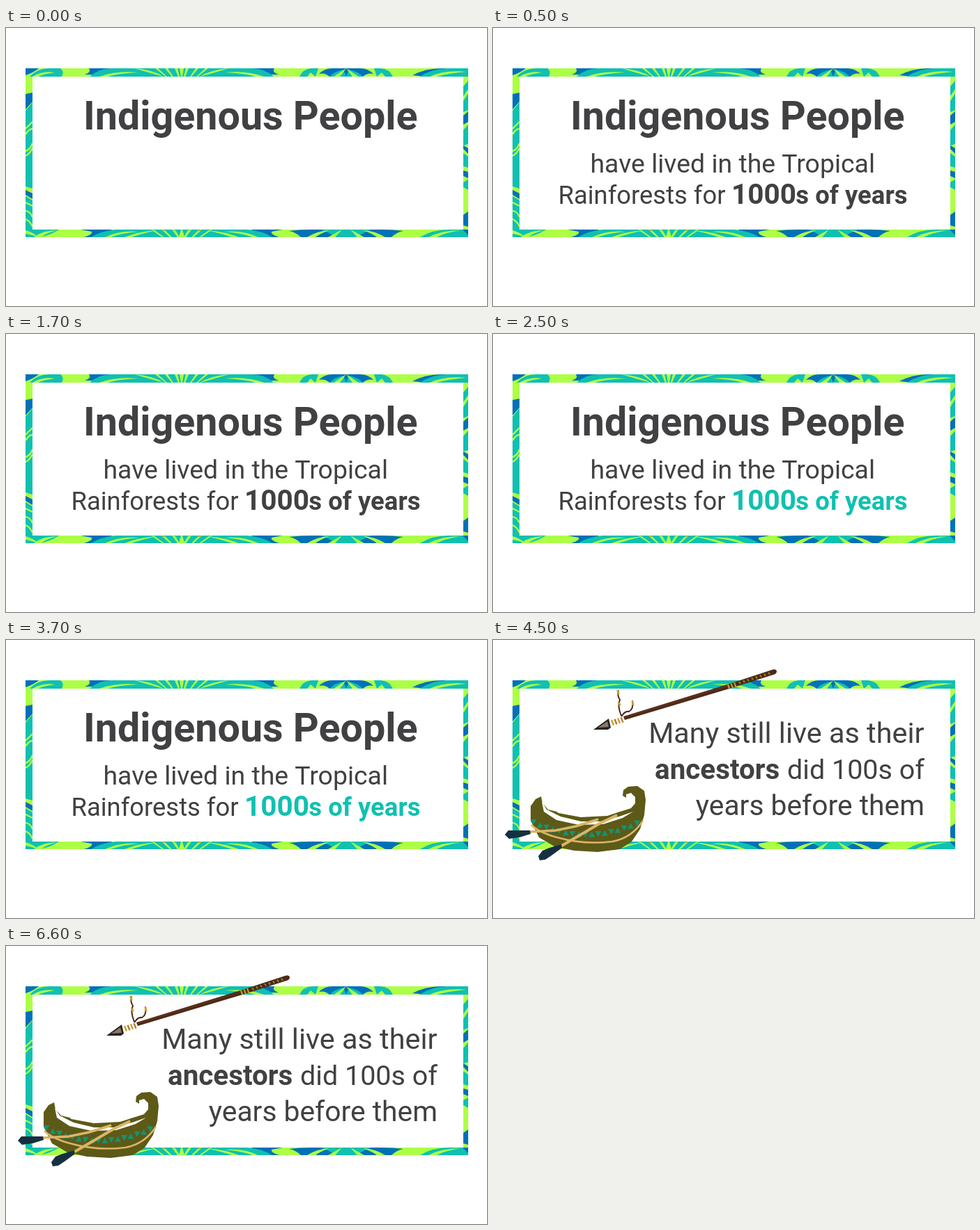
An HTML page with a canvas that plays this animation: 690x400 px, repeating every 8000 ms.

```html
<!DOCTYPE html>
<html lang="en">
<head>
<meta charset="utf-8">
<title>Indigenous People</title>
<style>
  html, body { margin: 0; width: 100%; height: 100%; overflow: hidden; background: #fff; }
  canvas { display: block; }
</style>
</head>
<body>
<canvas id="stage" width="690" height="400"></canvas>
<script>
const ctx = document.getElementById('stage').getContext('2d');
const LOOP = 8000;
const INK = '#414042', TEAL = '#10c0b1', LIME = '#adff46', BLUE = '#0071b8';
const OLIVE = '#5d5a18', TAN = '#dbb466', NAVY = '#17303f', BROWN = '#4c2a17', GOLD = '#c9a12c';

function fill(color, path) {
  ctx.fillStyle = color;
  ctx.fill(new Path2D(path));
}

function stroke(color, width, path) {
  ctx.strokeStyle = color;
  ctx.lineWidth = width;
  ctx.stroke(new Path2D(path));
}

function text(str, x, y, size, weight = 400, color = INK, align = 'left') {
  ctx.font = `${weight} ${size}px Roboto, sans-serif`;
  ctx.textAlign = align;
  ctx.fillStyle = color;
  ctx.fillText(str, x, y);
}

// Draws once as given and once reflected about the vertical line x = axis.
function mirrored(axis, draw) {
  draw();
  ctx.save();
  ctx.translate(2 * axis, 0);
  ctx.scale(-1, 1);
  draw();
  ctx.restore();
}

function topEdge() {
  fill(BLUE, 'M28 58H47Q38 65 28 68Z');
  fill(TEAL, 'M34 70Q45 58 62 58H78Q84 62 80 70Z');
  fill(LIME, 'M38 70Q52 61 70 64Q54 66 46 70Z');
  mirrored(252, () => {
    fill(BLUE, 'M119 58H150L132 67L113 67Q123 64 119 58Z');
    fill(TEAL, 'M120 70Q133 58 152 58H252V70Z');
    fill(LIME, 'M134 70Q157 61 190 64Q162 65 146 70ZM184 58Q210 60 226 70Q204 64 184 58Z');
    for (let i = 0; i < 3; i++) {
      const x = 247 - i * 9;
      fill(LIME, `M${x} 70L${x - 5 - i * 5} 58h4L${x + 2} 70Z`);
    }
  });
  fill(LIME, 'M249 58h6l-2 12h-2Z');
  mirrored(488, () => {
    fill(TEAL, 'M421 70Q426 59 438 58H448L444 70L437 64L432 70Z');
    fill(BLUE, 'M449 66Q457 58 468 58H488V70H464Q458 64 449 66Z');
    fill(TEAL, 'M464 70Q472 62 484 60L488 70Z');
    fill(LIME, 'M470 70L488 58L479 70Z');
  });
  fill(BLUE, 'M583 68Q602 58 624 58H632L605 70Z');
  fill(TEAL, 'M593 70Q612 58 635 58H663V70Z');
  fill(LIME, 'M608 70Q629 60 660 63Q634 65 618 70Z');
}

function bottomEdge() {
  fill(TEAL, 'M28 290H76Q64 298 48 301H28Z');
  fill(LIME, 'M28 291Q39 294 46 301Q36 297 28 296ZM40 301Q53 291 73 291Q58 295 50 301Z');
  mirrored(252, () => {
    fill(BLUE, 'M107 290H152L139 301H112Q125 297 123 293Z');
    fill(TEAL, 'M122 301Q136 292 158 290H252V301Z');
    fill(LIME, 'M142 301Q162 291 190 293Q166 295 150 301ZM170 301Q190 293 216 291Q194 296 180 301Z');
    for (let i = 0; i < 3; i++) {
      const x = 246 - i * 11;
      fill(LIME, `M${x} 301L${x - 8 - i * 4} 290l5 1L${x + 3} 301Z`);
    }
    fill('#d99a2b', 'M222 290h4l3 3Z');
  });
  fill(LIME, 'M251 290h2l3 11h-8Z');
  mirrored(488, () => {
    fill(BLUE, 'M406 292Q421 290 437 290H488V301H423Q416 294 406 292Z');
    fill(TEAL, 'M452 290H488V301H472Q464 294 452 290Z');
    fill(LIME, 'M432 301Q446 292 464 291Q450 296 444 301ZM462 301L482 290L472 301Z');
  });
  fill(TEAL, 'M594 301Q611 290 636 290H663V301Z');
  fill(LIME, 'M606 301Q625 291 652 291Q628 295 618 301Z');
  fill(BLUE, 'M655 290H663V298Z');
}

function sideEdges() {
  fill(BLUE, 'M28 95L38 93V106L28 117Z');
  fill(TEAL, 'M28 119L38 107V231L28 228Z');
  stroke(LIME, 2.4, 'M28 145L38 135M28 153Q33 145 38 145M28 177Q35 175 38 166M28 184Q34 181 38 173');
  fill(BLUE, 'M28 233L38 238V246L28 240Z');
  fill(TEAL, 'M28 242L38 248V290H28Z');
  stroke(LIME, 2.2, 'M28 251L38 256M28 263Q35 264 38 272M28 275Q35 278 38 286');
  fill(TEAL, 'M656 84L663 76V88L656 98Z');
  fill(TEAL, 'M656 105L663 94V118L656 121Z');
  fill(BLUE, 'M656 126L663 120V135L656 139Z');
  fill(TEAL, 'M656 147L663 139V167L656 169Z');
  fill(BLUE, 'M656 169L663 173V181L656 174Z');
  fill(TEAL, 'M656 180L663 185V201L656 199Z');
  fill(BLUE, 'M656 205L663 207V216L656 213Z');
  fill(TEAL, 'M656 222L663 218V233L656 229Z');
  fill(BLUE, 'M656 269L663 264V286L656 284Z');
}

function border() {
  ctx.save();
  ctx.beginPath();
  ctx.rect(28, 58, 635, 243);
  ctx.rect(38, 70, 618, 220);
  ctx.clip('evenodd');
  ctx.fillStyle = LIME;
  ctx.fillRect(28, 58, 635, 243);
  topEdge();
  bottomEdge();
  sideEdges();
  ctx.restore();
}

function spear() {
  ctx.lineCap = 'round';
  stroke(BROWN, 2, 'M184 109Q178 94 182 86Q178 80 180 73M185 109Q189 102 195 103Q202 99 200 88');
  stroke(GOLD, 3, 'M179 73l1 4M181 91l1 2M200 89l1 4');
  ctx.lineCap = 'butt';
  fill(BROWN, 'M187 110L336 64L400 43Q406 41 407 45Q407 49 402 50L339 70L189 115Z');
  stroke('#713524', 1, 'M189 111L337 66');
  fill('#262424', 'M144 129L166 113L169 126L165 129Z');
  fill('#8d7865', 'M151 126L164 117L166 125Z');
  for (let i = 0; i < 4; i++) stroke(i % 2 ? '#b57a32' : GOLD, 2.4, `M${170 + i * 4.5} ${115 - i * 1.3}l3 7.5`);
  for (let i = 0; i < 3; i++) stroke('#b5a42e', 2.2, `M${337 + i * 4.5} ${64 - i * 1.4}l2.5 6.5`);
  for (let i = 0; i < 8; i++) stroke('#a28327', 2, `M${353 + i * 6} ${60 - i * 1.9}l2 3`);
}

function canoe() {
  fill(OLIVE, 'M54 260L54 239L61 229L69 225L71 235L79 244L100 249L130 254L160 251L185 246L198 242L204 235' +
    'L204 226L198 220L191 222L191 227L186 224L187 216L194 211L207 210L217 217L219 230L217 252L211 272' +
    'L199 290L182 301L150 305L116 303L88 297L66 284Z');
  fill('#fff', 'M70 233L77 244L97 254L126 261L154 261L181 254L201 247L186 256L158 265L123 266L91 259L73 247Z');
  fill('#fff', 'M76 236L96 245L126 250L166 248L198 239L197 242L164 253L126 255L94 249Z');
  stroke(TAN, 2.5, 'M55 266Q66 277 92 284Q130 295 171 290Q199 285 215 260');

  // Triangles alternate along the sagging band of the hull.
  for (let i = 0; i < 17; i++) {
    const x = 58 + i * 9.3, u = (x - 134) / 76;
    const y = 280 - 18 * u * u, s = i % 2 ? 4 : -4;
    fill('#16936f', `M${x - 4.5} ${y + s}h9l-4.5 ${-2 * s}Z`);
  }

  stroke(TAN, 3.5, 'M52 276L90 274L119 268L151 258');
  stroke(TAN, 4, 'M95 298L126 280L153 264L178 252');
  fill(NAVY, 'M17 280L22 274L53 274L54 279L38 284L23 286Z');
  fill(NAVY, 'M65 311L71 303L81 299L98 294L99 299L84 310L75 316L67 317Z');
}

function drawIntro(t) {
  text('Indigenous People', 111, 146, 57.4, 700);
  if (t < 500) return;
  const accent = t < 2500 ? INK : TEAL;
  text('have lived in the Tropical', 139.5, 208, 37.4);
  text('Rainforests for', 93.5, 253, 36.4);
  text('1000', 342, 253, 40.5, 700, accent);
  text('s of years', 594.5, 253, 36.5, 700, accent, 'right');
}

function drawToday() {
  text('Many still live as their', 618.5, 148, 41.4, 400, INK, 'right');
  text('ancestors', 232, 200, 40.4, 700);
  text('did 100s of', 619, 200, 39.5, 400, INK, 'right');
  text('years before them', 619, 252, 40.8, 400, INK, 'right');
  spear();
  canoe();
}

function render(now) {
  const t = now % LOOP;
  ctx.fillStyle = '#fff';
  ctx.fillRect(0, 0, 690, 400);
  border();
  if (t < 4500) drawIntro(t);
  else drawToday();
}

let start;
function tick(now) {
  start ??= now;
  render(now - start);
  requestAnimationFrame(tick);
}
render(0);
requestAnimationFrame(tick);
</script>
</body>
</html>
```
